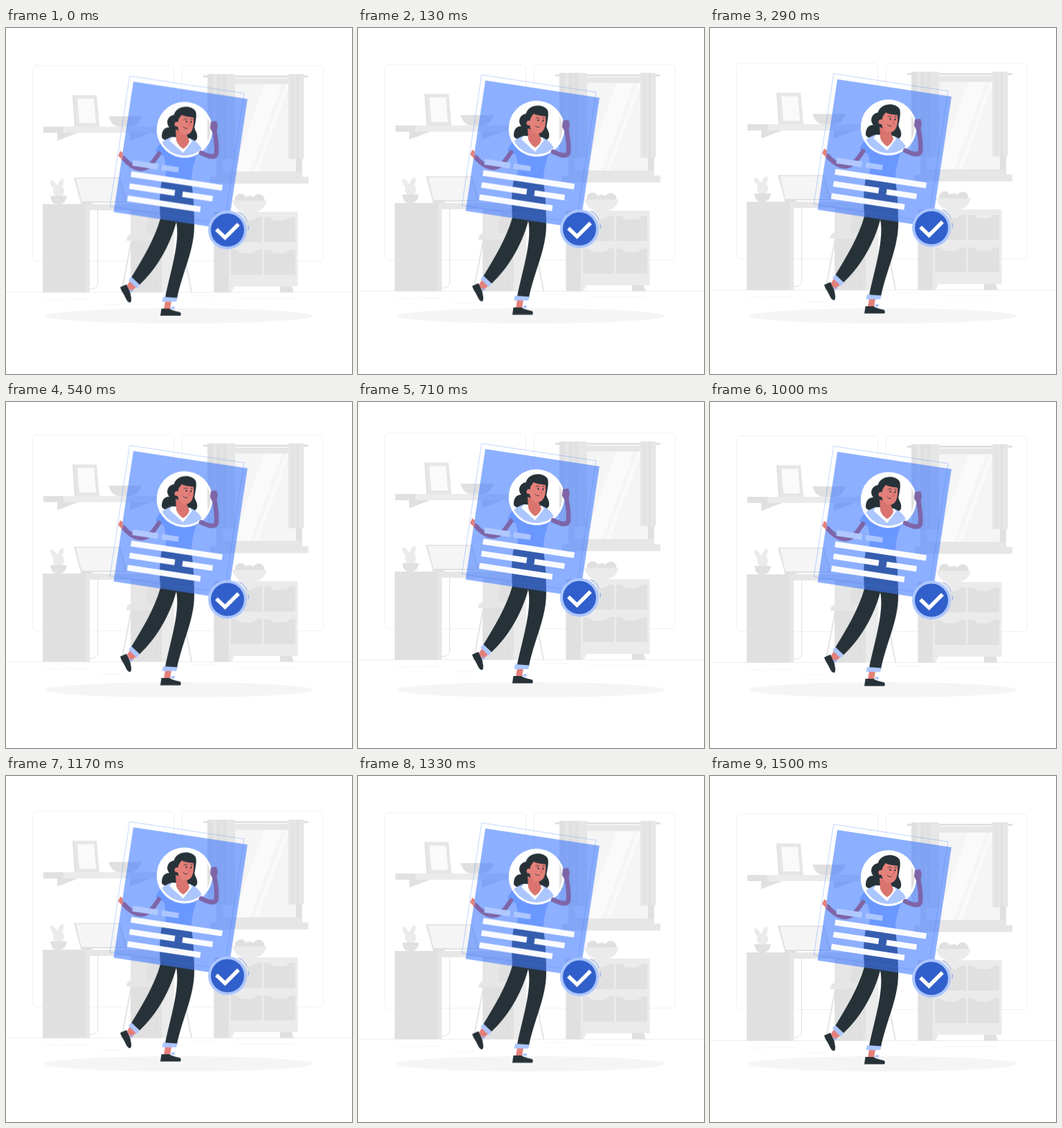
An HTML page without scripts that plays this animation: 500 px wide and 500 px high, repeating every 1540 ms.

```html
<!DOCTYPE html>
<html lang="en">
<head>
<meta charset="utf-8">
<title>Floating profile card</title>
<style>
  html, body { margin: 0; width: 100%; height: 100%; overflow: hidden; background: #fff; }
  svg { display: block; width: 100%; height: 100%; }
  .float { animation: float 1540ms infinite; }
  @keyframes float {
    0% { transform: translateY(-.55px); animation-timing-function: steps(17); }
    46% { transform: translateY(-10px); animation-timing-function: steps(18); }
    94.7%, 100% { transform: translateY(0); }
  }
  .line { fill: none; stroke-linecap: round; stroke-linejoin: round; }
  .g1 { fill: #f5f5f5; }
  .g2 { fill: #ebebeb; }
  .g3 { fill: #e0e0e0; }
  .g4 { fill: #e6e6e6; }
  .skin { fill: #e4807a; }
  .dark { fill: #263238; }
  .pale { fill: #acc6ff; }
</style>
</head>
<body>
<svg viewBox="0 0 500 500" preserveAspectRatio="none">
  <defs>
    <path id="niche" d="M0 0H6C10 0 11 5 17 5H28C34 5 35 0 39 0H45V36H0Z"/>
  </defs>
  <ellipse cx="250" cy="416" rx="194" ry="11" class="g1"/>
  <g class="float">

    <!-- walls and floor -->
    <g class="line" stroke="#f1f1f1">
      <rect x="38.5" y="55" width="204" height="282.5" rx="5"/>
      <rect x="254.5" y="55" width="204" height="282.5" rx="5"/>
      <path d="M0 382.5H500" stroke="#ededed"/>
      <path d="M57 393H80M87 392.5H120M137 400H168M270 387.5H303M333 391H416" stroke="#f5f5f5"/>
    </g>

    <!-- wall shelf -->
    <path class="g2" d="M54 143H218V152H54Z"/>
    <path class="g3" d="M54 143H83V152H54ZM74 152H104L74 163.500ZM179 152H209L179 163.500Z"/>
    <path class="g3" d="M96 97.500H100L104 143H99Z"/>
    <path class="g4" d="M98 97.500H131L135 143H101Z"/>
    <path fill="#fafafa" d="M103 102.500H127L130 138H106Z"/>
    <path class="g3" d="M148 128H196C193 138 186 143 180 143H164C157 143 151 138 148 128Z"/>

    <!-- window -->
    <path class="g4" d="M304 73H428V216H304Z"/>
    <path class="g1" d="M313 81.500H419V208H313Z"/>
    <path fill="#fafafa" d="M373 82H399L353 208H328ZM404 82H410L364 208H358Z"/>
    <path class="g3" d="M285 69H437V72H285ZM419 189H428V211H419Z"/>
    <path class="g4" d="M295 215.500H437V225.500H295ZM304 208H428V216H304Z"/>
    <path class="g4" d="M291 67H331V190H291ZM408 67H430.500V189.500H408Z"/>
    <path class="g3" d="M291 67H299V190H291ZM304 67H311V190H304ZM313 67H318V190H313ZM413 67H415V189H413ZM420 67H423V189H420Z"/>

    <!-- cabinet -->
    <g class="g3">
      <circle cx="339" cy="248.500" r="8.500"/>
      <circle cx="352" cy="251" r="8"/>
      <circle cx="365" cy="249" r="8.500"/>
    </g>
    <path class="g2" d="M327 250H377C374 261 366 266 359 266H345C337 266 330 261 327 250Z"/>
    <path class="g2" d="M300.500 266H421.500V374H396L330 374L326 382.500H300.500Z"/>
    <path class="g3" d="M300.500 266H322V382.500H300.500ZM396 374H413L416 382.500H396Z"/>
    <g class="g3">
      <use href="#niche" x="325" y="274"/>
      <use href="#niche" x="373" y="274"/>
      <use href="#niche" x="325" y="321"/>
      <use href="#niche" x="373" y="321"/>
    </g>

    <!-- desk, laptop, plant and chair -->
    <path class="line" stroke="#dedede" d="M132.500 264V369Q132.500 378 121 378"/>
    <path class="g4" d="M115 255H230V264H121V382.500H115Z"/>
    <path class="g3" d="M53 255H115V382.500H53ZM180 264H225V382.500H180Z"/>
    <path class="g2" d="M225 264H243V382.500H225Z"/>
    <path class="g3" d="M98 216.500H165L175 253H108Z"/>
    <path class="g1" d="M101 218H164L172 251H109Z"/>
    <path class="g3" d="M108 252.500H125V255H108Z"/>
    <g class="g2">
      <ellipse cx="76" cy="236" rx="8" ry="9"/>
      <ellipse cx="69" cy="227" rx="3.500" ry="8" transform="rotate(-32 69 227)"/>
      <ellipse cx="79" cy="225.500" rx="3.500" ry="8" transform="rotate(24 79 225.500)"/>
    </g>
    <path class="g3" d="M64 243H88C87 251 82 255 78 255H73C68 255 65 251 64 243Z"/>
    <path class="g4" d="M180 268H206L203 299H180Z"/>
    <path class="g4" d="M181 299H238V308H174C174 302 177 299 181 299Z"/>
    <path class="line" stroke="#e4e4e4" stroke-width="2" d="M181 308L167 382M222 308L210 382M214 308L224 382M254 308L268 382"/>

    <!-- legs -->
    <path class="skin" d="M179 366L188 375L181 381L174 374ZM230 395H239L237 407H228Z"/>
    <path class="dark" d="M165 375L174 371C176 377 180 380 180 386Q182 394 180 397C176 398 174 393 172 389C170 384 166 380 165 375Z"/>
    <path class="dark" d="M224.500 406H236C241 409 246 410 251 411Q254 413 252 416.500H223Z"/>
    <path class="line" stroke="#8eafff" d="M238 406L241 403L243 407L239 405L244 404M179 381L183 378L182 382L178 379"/>
    <path class="dark" d="M226 217C221 238 222 258 223 276C215 305 197 335 181 361L193 371.500C216 350 236 318 246 281C252 310 237 355 230 390L247 391.500C256 350 272 322 272 286C272 255 270 235 267 220Z"/>
    <path class="pale" d="M181 360L193 371.500L189 376.500L177 365ZM227 389L248 390.500L246 396H225.500Z"/>

    <!-- hair, head and torso -->
    <path class="dark" d="M243 125C247 112 268 111 274 121C276 127 274 134 273 141C270 147 278 151 276 160C272 168 263 166 257 162L246 161C240 165 226 164 225 158C225 150 228 144 236 144C230 137 234 127 243 126Z"/>
    <path class="pale" d="M239 158C227 162 219 170 216 179L228 186C233 202 231 211 229 219L268 221C268 206 272 196 275 185L285 182C283 171 275 164 266 160Z"/>
    <path fill="#fff" d="M240 158L236 163L256 181L269 164L265 160Z"/>
    <path fill="#d9746f" d="M245 147L246 163Q249 171 256 175Q263 171 265 164L260 152Z"/>
    <path class="skin" d="M250 126C249 135 248 139 248 143C250 153 256 156 262 154.500C270 152 272 142 271 128C265 122 256 121 250 126Z"/>
    <circle class="skin" cx="247" cy="139.500" r="3.500"/>
    <path class="dark" d="M247 136C249 134 250 130 254 126C261 130 268 128 273 131C276 121 268 115 258 117C247 119 243 128 247 136Z"/>
    <g class="line" stroke="#263238" stroke-width=".8">
      <path d="M257 132.500Q259 130.500 262 132M266.500 132L269.500 132.500M256 143.500Q259 147 262 145.500"/>
      <path d="M264.500 136L266 142L263.500 142.500" stroke="#c85d58"/>
    </g>
    <ellipse class="dark" cx="260.500" cy="135.500" rx="1" ry="1.500"/>
    <ellipse class="dark" cx="267.500" cy="136" rx="1" ry="1.500"/>

    <!-- card -->
    <g transform="translate(184 78) rotate(8.6)">
      <path fill="#407bff" fill-opacity=".6" fill-rule="evenodd" d="M0 0H166.800V190.700H0ZM45.100 57.700a38.500 38.500 0 1 0 77 0a38.500 38.500 0 1 0 -77 0Z"/>
      <rect x="-6.100" y="-7.200" width="166.800" height="190.700" class="line" stroke="#407bff" stroke-opacity=".5" stroke-width=".6"/>
      <circle cx="83.600" cy="57.700" r="38.800" class="line" stroke="#fff" stroke-width="3"/>
      <g class="pale">
        <rect x="16.500" y="112.300" width="37" height="8"/>
        <rect x="59" y="112.500" width="24.700" height="7.700"/>
      </g>
      <g fill="#fafbff">
        <rect x="16.700" y="128.400" width="133.200" height="8.300"/>
        <rect x="17" y="146" width="66.200" height="8.300"/>
        <rect x="94.500" y="146.300" width="44" height="8"/>
        <rect x="16.700" y="163.900" width="106.700" height="8.300"/>
      </g>
    </g>

    <!-- arms seen through the card -->
    <g class="line" stroke="#7e65a8" stroke-width="6.500">
      <path d="M221 182C213 194 207 203 196 204C186 204 177 197 170 189"/>
      <path d="M282 181C292 186 302 189 304 182C305 168 303 159 301 148"/>
    </g>
    <path fill="#7e65a8" d="M296 136L304 135L306 142L304 151H298L295 145Z"/>
    <path class="skin" d="M165 178L169 181L168 186L170 190L166 189L162 185Z"/>
    <g fill="#b0c8ff" transform="translate(184 78) rotate(8.6)">
      <rect x="16.500" y="112.300" width="37" height="8"/>
    </g>

    <!-- badge -->
    <circle cx="320" cy="292.500" r="28" class="pale"/>
    <circle cx="320" cy="292.500" r="24" fill="#315fcb"/>
    <path class="line" stroke="#fff" stroke-width="5.500" style="stroke-linecap:butt;stroke-linejoin:miter" d="M304 291.500L316.500 303.500L336 284"/>
    <path class="line" stroke="#6f98f5" stroke-width=".9" d="M337 267Q345 271 348 279M350 286Q351 289 350 292"/>
  </g>
</svg>
</body>
</html>
```
